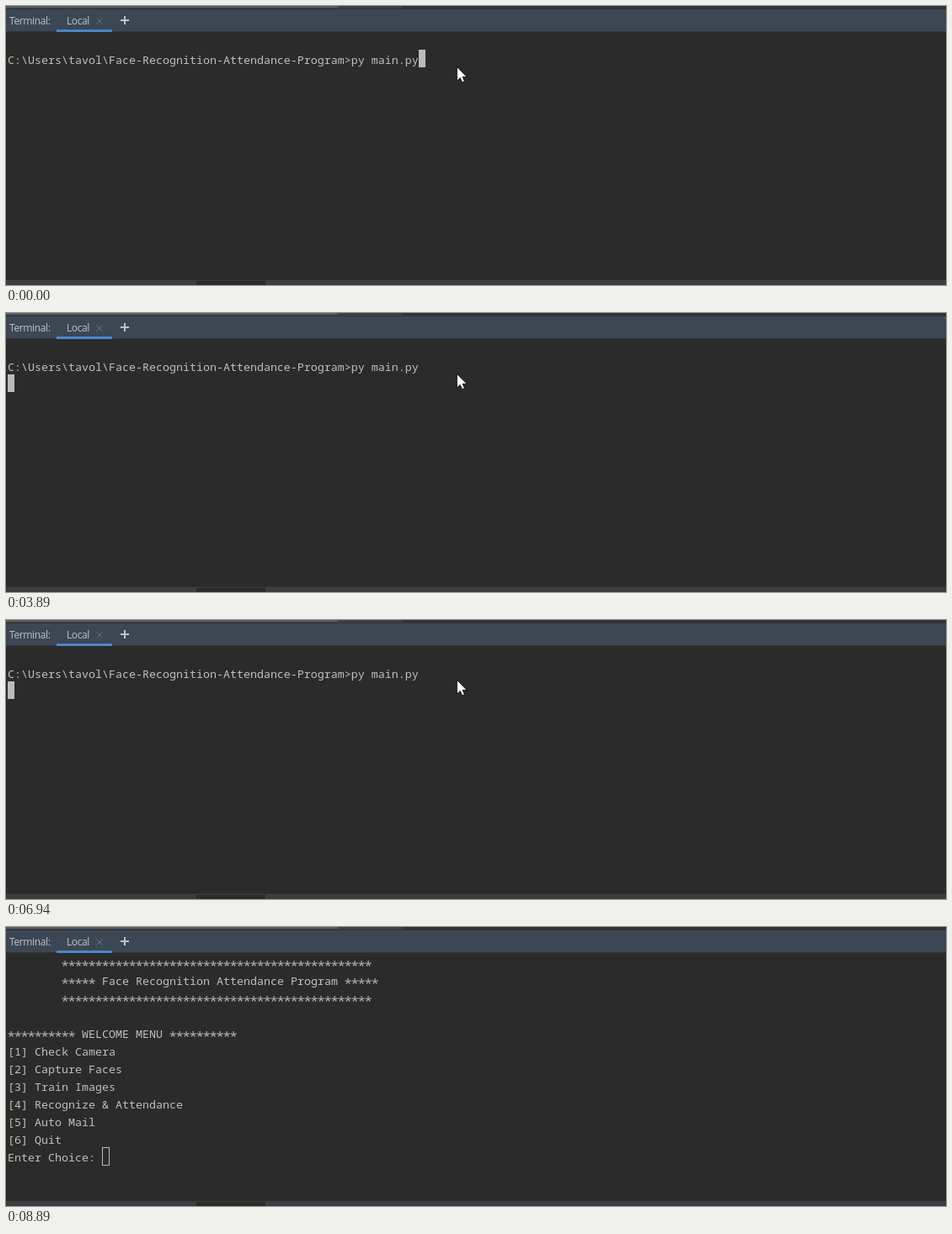
An HTML page for the animation above (8.99 s loop, 1116 by 332 pixels).

```html
<!DOCTYPE html>
<html lang="en">
<head>
<meta charset="utf-8">
<title>Terminal session</title>
<style>
  html, body { margin: 0; width: 100%; height: 100%; overflow: hidden; background: #2b2b2b; }
  svg { display: block; width: 1116px; height: 332px; }
  .ui { font: 12px "Open Sans", "Noto Sans", sans-serif; letter-spacing: -.38px; fill: #bfc3c7; }
  .mono { font: 13.3333px "Noto Sans Mono", "DejaVu Sans Mono", monospace; fill: #c5bfb9; white-space: pre; }
  .star { font-size: 17px; letter-spacing: -2.2px; fill: #b0b6b7; }
</style>
</head>
<body>
<svg viewBox="0 0 1116 332" xmlns="http://www.w3.org/2000/svg">
  <rect width="1116" height="332" fill="#2b2b2b"/>

  <!-- tool window header -->
  <rect width="1116" height="4" fill="#313335"/>
  <rect width="471" height="3" fill="#3e4143"/>
  <rect width="394" height="2" fill="#5c5d5e"/>
  <rect y="4" width="1116" height="26" fill="#3c4754"/>
  <rect y="30" width="1116" height="1" fill="#323436"/>
  <rect x="60" y="28" width="66" height="3" fill="#4a88c7"/>
  <text class="ui" x="4" y="22">Terminal:</text>
  <text class="ui" x="72" y="22">Local</text>
  <path d="M107.5 14.5l7 7m0-7l-7 7" stroke="#6c747c" fill="none"/>
  <path d="M136 17h10M141 12v10" stroke="#bfc3c7" stroke-width="2" fill="none"/>

  <!-- bottom scrollbar -->
  <rect y="326" width="1116" height="6" fill="#3c3d3f"/>
  <rect x="226" y="327" width="82" height="5" fill="#2b2b2b"/>

  <g id="prompt" class="mono"></g>
  <g id="menu" class="mono"></g>
  <rect id="block" width="8" height="21" fill="#bbbbbb"/>
  <rect id="hollow" x="114.5" y="262.5" width="8" height="21" fill="none" stroke="#bbbbbb"/>
  <path id="mouse" d="M.4.4V17L4.2 13.4 6.6 18.8 9.4 17.6 7.1 12.3H12Z" fill="#fff" stroke="#000" stroke-width=".8"/>
</svg>
<script>
const LOOP = 8990, LEFT = 2, CELL = 8, ROW = 21, TOP = 31;
const MENU_AT = 7370, HOLLOW_AT = 8890;
const el = id => document.getElementById(id);

const promptLine = "C:\\Users\\tavol\\Face-Recognition-Attendance-Program>py main.py";
const rule = " ".repeat(8) + "*".repeat(46);
const stars = "*".repeat(10);
const menuLines = [
  rule,
  " ".repeat(8) + "***** Face Recognition Attendance Program *****",
  rule,
  "",
  `${stars} WELCOME MENU ${stars}`,
  "[1] Check Camera",
  "[2] Capture Faces",
  "[3] Train Images",
  "[4] Recognize & Attendance",
  "[5] Auto Mail",
  "[6] Quit",
  "Enter Choice:"
];

// Runs of asterisks are larger and centred in the row.
function addLine(group, line, row) {
  for (const run of line.matchAll(/\*+|[^*]+/g)) {
    const lead = run[0].length - run[0].trimStart().length;
    const content = run[0].trim();
    if (!content) continue;
    const isStar = content[0] === "*";
    const text = document.createElementNS("http://www.w3.org/2000/svg", "text");
    text.setAttribute("x", LEFT + (run.index + lead) * CELL - (isStar ? 1.1 : 0));
    text.setAttribute("y", TOP + row * ROW + 17 + (isStar ? 4.7 : 0));
    if (isStar) text.setAttribute("class", "star");
    text.textContent = content;
    group.append(text);
  }
}
addLine(el("prompt"), promptLine, 1);
menuLines.forEach((line, row) => addLine(el("menu"), line, row));

// [start, column, row]; a bare [start] hides the caret
const caret = [
  [0, 61, 1], [120],
  [410, 0, 2], [1370], [1900, 0, 2], [2430],
  [2930, 0, 2], [3360], [3890, 0, 2], [4390],
  [4890, 0, 2], [5420], [5910, 0, 2], [6410],
  [6940, 0, 2], [MENU_AT, 14, 11], [7880],
  [8460, 14, 11], [HOLLOW_AT]
];

// [start, x, y]
const pointer = [
  [0, 535, 72], [5540, 535, 71],
  [7520, 512, 81], [7640, 490, 105], [7760, 640, 170],
  [7880, 858, 250], [8000, 1023, 307], [8150]
];

const show = (node, on) => node.setAttribute("visibility", on ? "visible" : "hidden");

function place(node, steps, t, toPixels) {
  const [, a, b] = steps.findLast(step => step[0] <= t);
  show(node, a !== undefined);
  if (a !== undefined) node.setAttribute("transform", `translate(${toPixels(a, b)})`);
}

function draw(now) {
  const t = now % LOOP;
  show(el("prompt"), t < MENU_AT);
  show(el("menu"), t >= MENU_AT);
  show(el("hollow"), t >= HOLLOW_AT);
  place(el("block"), caret, t, (col, row) => [LEFT + col * CELL, TOP + row * ROW]);
  place(el("mouse"), pointer, t, (x, y) => [x, y]);
}

const start = performance.now();
function tick() {
  draw(performance.now() - start);
  requestAnimationFrame(tick);
}
tick();
</script>
</body>
</html>
```
